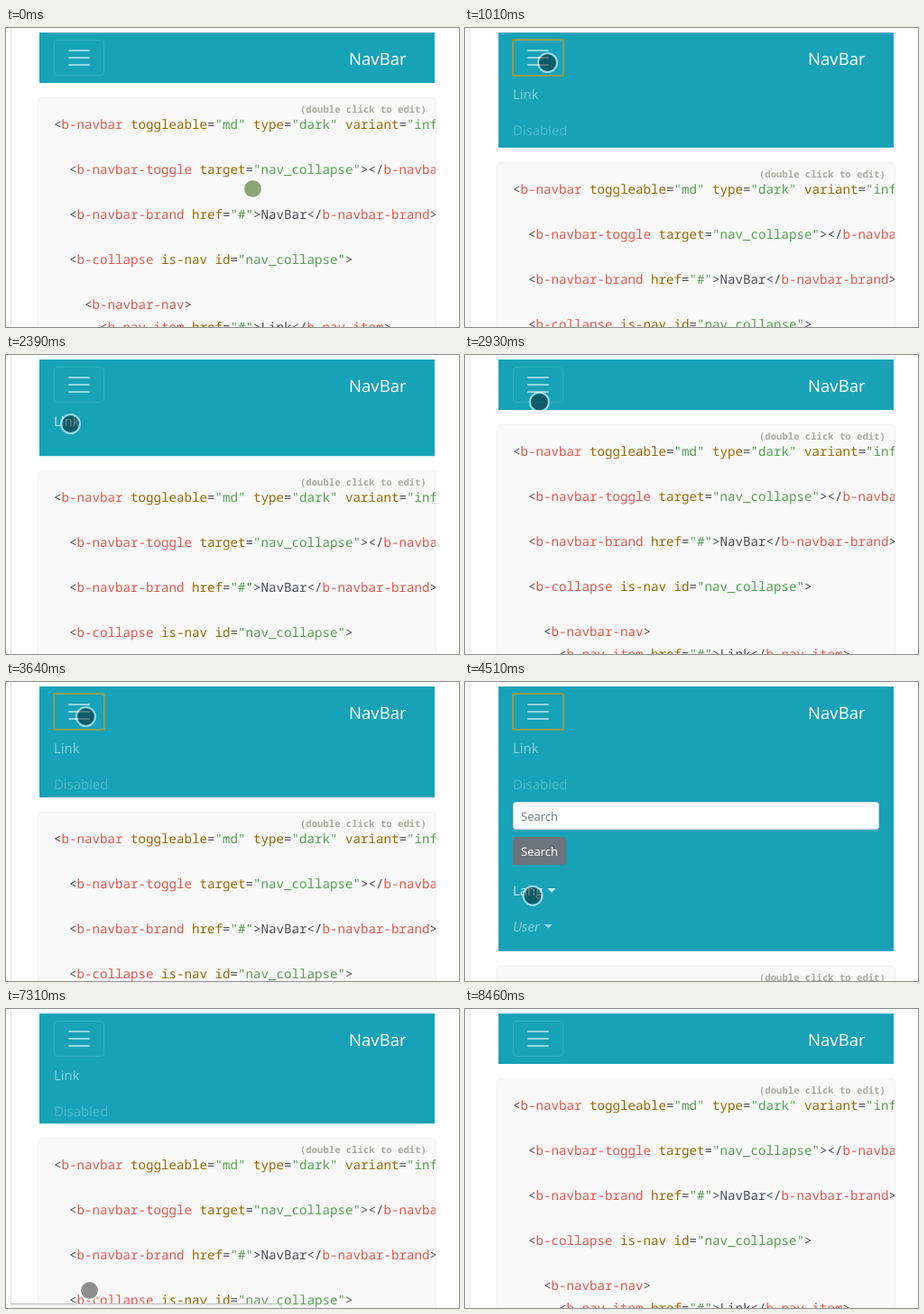
An HTML page with a canvas that plays this animation: 502 px wide and 332 px high, repeating every 9.31 s.

```html
<!DOCTYPE html>
<html lang="en">
<head>
<meta charset="utf-8">
<title>Collapsing navbar</title>
<style>
html, body { margin: 0; width: 100%; height: 100%; overflow: hidden; background: #fff; }
canvas { display: block; width: 502px; height: 332px; }
</style>
</head>
<body>
<canvas id="stage" width="502" height="332"></canvas>
<script>
const ctx = document.getElementById('stage').getContext('2d');
const LOOP = 9310;
const UI = '"Open Sans", "Noto Sans", sans-serif';
const MONO = '"Noto Sans Mono", "DejaVu Sans Mono", monospace';
const TEAL = '#17a2b8';
const FOCUS = 'rgba(229,151,0,.58)';
const CLOSED = 61, OPEN = 299, TALL = 449;

const CODE = [
  '<b-navbar toggleable="md" type="dark" variant="info">',
  '',
  '  <b-navbar-toggle target="nav_collapse"></b-navbar-toggle>',
  '',
  '  <b-navbar-brand href="#">NavBar</b-navbar-brand>',
  '',
  '  <b-collapse is-nav id="nav_collapse">',
  '',
  '    <b-navbar-nav>',
  '      <b-nav-item href="#">Link</b-nav-item>'
];

// pointer path: time, x, y
const PATH = [
  [0, 273.5, 178.5], [70, 273.5, 178.5], [640, 91.5, 38.5], [1300, 91.5, 38.5],
  [1640, 75.5, 62.5], [1790, 71.5, 70.5], [2030, 71.5, 76.5], [2800, 71.5, 76.5],
  [3020, 88.5, 38.5], [3900, 88.5, 38.5], [4330, 79.5, 221.5], [4570, 74.5, 238.5],
  [5300, 74.5, 238.5], [5520, 101.5, 296.5], [5770, 101.5, 296.5], [5980, 101.5, 307.5],
  [6220, 101.5, 312.5], [6400, 101.5, 312.5], [6680, 92.5, 312.5], [7690, 92.5, 312.5],
  [8000, 180, 267.5], [8300, 287.5, 322.5], [LOOP, 287.5, 322.5]
];

const clamp = v => Math.max(0, Math.min(1, v));
const ramp = (t, a, b) => clamp((t - a) / (b - a));
const mix = (a, b, p) => a + (b - a) * p;

// cubic-bezier(.25, .1, .25, 1)
function ease(x) {
  if (x <= 0 || x >= 1) return clamp(x);
  let lo = 0, hi = 1, s = .5;
  for (let i = 0; i < 20; i++) {
    s = (lo + hi) / 2;
    if (.75 * s * (1 - s) + s ** 3 < x) lo = s; else hi = s;
  }
  return .3 * s * (1 - s) ** 2 + 3 * (1 - s) * s * s + s ** 3;
}

// monotone cubic through the path points
function along(t, k) {
  const slope = i => i < 0 || i > PATH.length - 2 ? 0
    : (PATH[i + 1][k] - PATH[i][k]) / (PATH[i + 1][0] - PATH[i][0]);
  const tangent = i => {
    const a = slope(i - 1), b = slope(i);
    return a * b <= 0 ? 0 : 2 * a * b / (a + b);
  };
  let i = 0;
  while (i < PATH.length - 2 && t >= PATH[i + 1][0]) i++;
  const d = PATH[i + 1][0] - PATH[i][0], u = (t - PATH[i][0]) / d, v = 1 - u;
  return PATH[i][k] * v * v * (1 + 2 * u) + PATH[i + 1][k] * u * u * (3 - 2 * u)
    + d * u * v * (tangent(i) * v - tangent(i + 1) * u);
}

function barBottom(t) {
  const move = (a, b, start) => mix(a, b, ease((t - start) / 350));
  if (t < 2000) return move(CLOSED, OPEN, 940);
  if (t < 3300) return move(OPEN, CLOSED, 2222);
  if (t < 4720) return move(CLOSED, OPEN, 3573);
  return move(TALL, CLOSED, 7126);
}

function text(str, x, y, size, color, family = UI, style = '') {
  ctx.font = `${style} ${size}px ${family}`;
  ctx.fillStyle = color;
  ctx.fillText(str, x, y);
}

function rect(x, y, w, h, fill, stroke, r = 0, line = 1) {
  ctx.beginPath();
  ctx.roundRect(x, y, w, h, r);
  if (fill) { ctx.fillStyle = fill; ctx.fill(); }
  if (stroke) { ctx.strokeStyle = stroke; ctx.lineWidth = line; ctx.stroke(); }
}

function clipped(x, y, w, h, draw) {
  ctx.save();
  ctx.beginPath();
  ctx.rect(x, y, w, h);
  ctx.clip();
  draw();
  ctx.restore();
}

const white = a => `rgba(255,255,255,${a})`;

function caret(x, y, color) {
  ctx.fillStyle = color;
  ctx.beginPath();
  ctx.moveTo(x, y);
  ctx.lineTo(x + 9.6, y);
  ctx.lineTo(x + 4.8, y + 4.8);
  ctx.fill();
}

function codeLine(line, y) {
  const put = (str, col, color) => text(str, 53 + col * 8.5, y, 14.17, color, MONO);
  let end = 0;
  for (const m of line.matchAll(/(?<=<\/?)[\w-]+|[\w-]+(?==)|(?<= )is-nav|"[^"]*"/g)) {
    const s = m[0];
    put(line.slice(end, m.index), end, '#4a4c53');
    put(s, m.index, s[0] === '"' ? '#50a14f' : /[<\/]/.test(line[m.index - 1]) ? '#e45649' : '#986801');
    end = m.index + s.length;
  }
  put(line.slice(end), end, '#4a4c53');
}

function drawCode(top) {
  if (top > 332) return;
  rect(35.5, top + .5, 441, 500, '#f9f9f9', '#f1f1f1', 4);
  clipped(36, top, 440, 400, () => {
    text('(double click to edit)', 326, top + 17, 10.6, '#a9aaa4', MONO, 'bold');
    CODE.forEach((line, i) => codeLine(line, top + 35 + i * 25));
  });
}

function drawToggle(focused) {
  rect(53.5, 13.5, 55, 39, null, white(.1), 4);
  ctx.strokeStyle = white(.55);
  ctx.lineWidth = 2;
  ctx.lineCap = 'round';
  for (const y of [25, 33, 41]) {
    ctx.beginPath();
    ctx.moveTo(70, y);
    ctx.lineTo(92, y);
    ctx.stroke();
  }
  if (focused) rect(53, 13, 56, 40, null, FOCUS, 1, 2);
}

function drawMenu(t, py) {
  const dropped = t >= 4720 && t < 7070;
  const tone = (y, on) => white(on ? 1 : py > y && py < y + 40 ? .75 : .5);
  text('Link', 53, 79, 14.9, tone(54));
  text('Disabled', 53, 119, 14.9, white(.25));
  rect(53.5, 133.5, 405, 30, '#fff', '#ced4da', 3);
  text('Search', 62, 154, 13, '#6c757d');
  rect(53, 172, 59, 31, '#6c757d', null, 3);
  text('Search', 62, 193, 13, '#fff');
  const lang = tone(211, dropped);
  text('Lang', 53, 237, 14.9, lang);
  caret(91.3, 229, lang);
  if (dropped) {
    rect(53.5, 253.5, 405, 146, '#fff', 'rgba(0,0,0,.15)', 4);
    rect(54, 262, 404, 32, '#f8f9fa', FOCUS, 0, 2);
    text('EN', 78, 284, 14.9, '#212529');
    text('ES', 78, 316, 14.9, '#212529');
  } else {
    const user = tone(251);
    text('User', 53, 277, 14.9, user, UI, 'italic');
    caret(87.5, 269, user);
  }
}

function drawStatus(t) {
  const alpha = ramp(t, 4720, 4970) * (1 - ramp(t, 7360, 7540));
  if (!alpha) return;
  const top = t < 5980 ? mix(311, 321, ramp(t, 5830, 5980)) : mix(321, 327, ramp(t, 5980, 6220));
  const right = mix(171, 306, ease(ramp(t, 6430, 6680)));
  ctx.globalAlpha = alpha;
  clipped(5, 300, 310, 32, () => {
    rect(0, top + .5, right - .5, 40, '#f2f2f2', '#bdbdbd', 4);
    text(right > 240 ? 'js.org/docs/components/navbar/#' : 'js.org/docs/…/navbar', 18, top + 15, 11.4, '#6b6b6b');
  });
  ctx.globalAlpha = 1;
}

function drawPointer(t, x, y) {
  const disc = (r, w) => {
    ctx.beginPath();
    ctx.arc(x, y, r, 0, Math.PI * 2);
    if (w) {
      ctx.lineWidth = w;
      ctx.strokeStyle = white(.55);
      ctx.stroke();
    } else ctx.fill();
  };
  ctx.fillStyle = t < 400 ? 'rgba(47,98,11,.55)' : 'rgba(0,0,0,.43)';
  disc(9.5);
  disc(10.5, 2);
}

function draw(t) {
  const bottom = barBottom(t);
  const x = along(t, 1), y = along(t, 2);
  ctx.textRendering = 'geometricPrecision';
  ctx.fillStyle = '#fff';
  ctx.fillRect(0, 0, 502, 332);
  ctx.fillStyle = '#fdfdfd';
  ctx.fillRect(0, 0, 5, 332);
  ctx.fillStyle = '#e3e3e3';
  ctx.fillRect(5, 0, 1, 332);

  drawCode(bottom + 16);
  ctx.fillStyle = TEAL;
  ctx.fillRect(37, 5, 438, bottom - 5);
  text('NavBar', 380, 41, 18.6, '#fff');
  drawToggle((t >= 860 && t < 2180) || (t >= 3480 && t < 4720));
  if (bottom > CLOSED) clipped(37, 53, 438, bottom - 61, () => drawMenu(t, y));
  drawStatus(t);
  if (t < 8460) drawPointer(t, x, y);
}

const start = performance.now();
function tick() {
  draw((performance.now() - start) % LOOP);
  requestAnimationFrame(tick);
}
tick();
</script>
</body>
</html>
```
